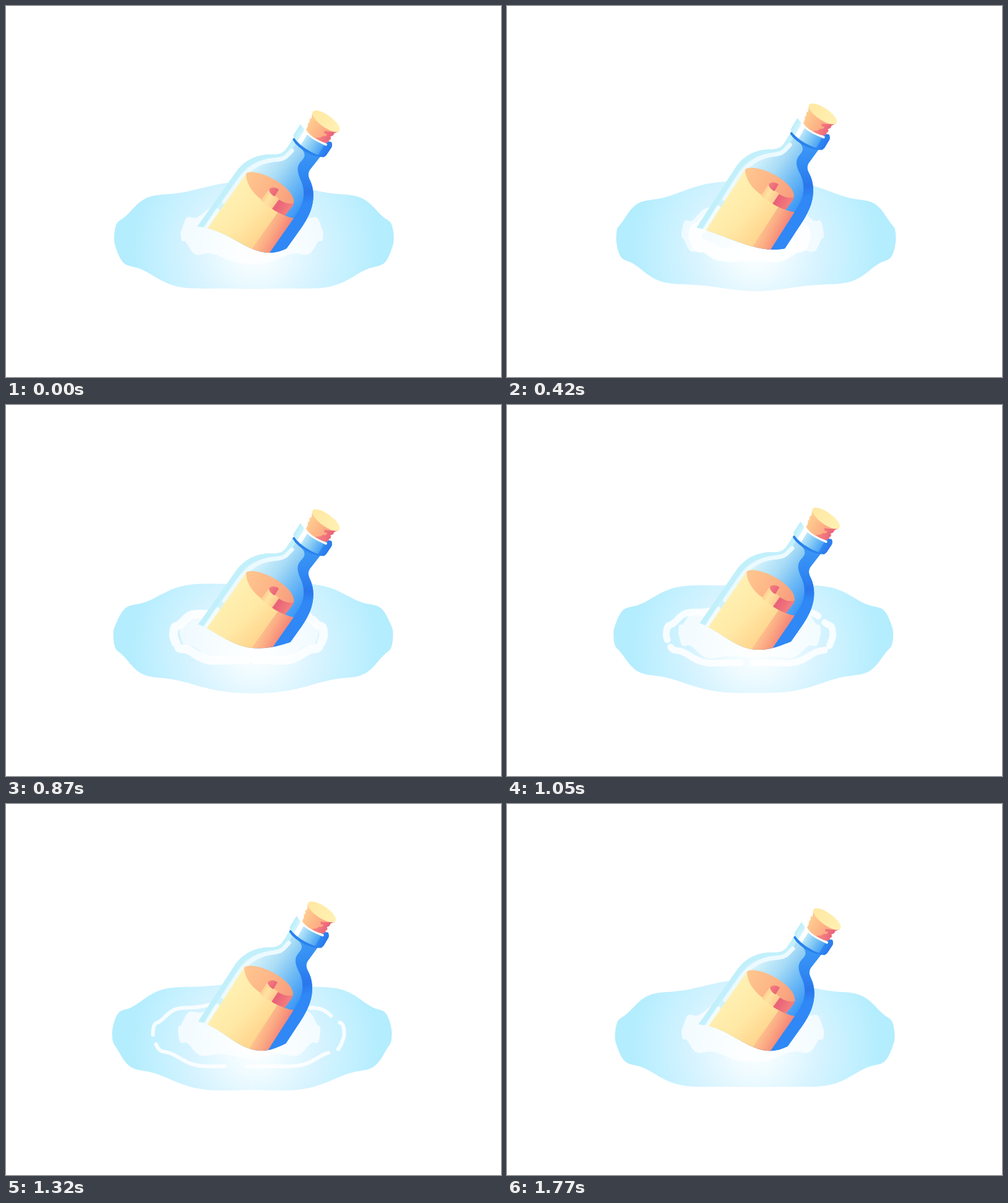
These frames come from a looping animation (800x600 px, 1.8 s). An HTML page with a canvas:

```html
<!DOCTYPE html>
<html lang="en">
<head>
<meta charset="utf-8">
<title>Message in a bottle</title>
<style>
html, body { margin: 0; width: 100%; height: 100%; overflow: hidden; background: #fff; }
canvas { display: block; width: 800px; height: 600px; }
</style>
</head>
<body>
<canvas id="stage" width="800" height="600"></canvas>
<script>
const ctx = document.getElementById('stage').getContext('2d');
const LOOP = 1800, STEP = 30, TAU = 2 * Math.PI;

const turn = x => Math.cos(TAU * x);
function smooth(x) {
  const u = Math.max(0, Math.min(1, x));
  return u * u * (3 - 2 * u);
}

// Soft oval whose waves run from its top and bottom out to both sides.
function rimPoint(o, deg) {
  const a = deg * Math.PI / 180, c = Math.cos(a), s = Math.sin(a), h = Math.abs(s);
  const crest = Math.pow(Math.asin(Math.min(1, Math.abs(c))) / .92, 1.5) - o.phase;
  const wave = o.amp * Math.tanh(5 * h);
  const lift = Math.pow(h, .87);
  const dy = s >= 0 ? o.down * lift - wave * turn(crest)
                    : wave * turn(crest + .58) - o.up * lift;
  return [o.x + o.rx * c, o.y + dy + (o.sway || 0) * Math.pow(c, 8)];
}

function rimArc(o, from, to, path = new Path2D()) {
  const n = Math.ceil((to - from) / 2);
  path.moveTo(...rimPoint(o, from));
  for (let i = 1; i <= n; i++) path.lineTo(...rimPoint(o, from + (to - from) * i / n));
  return path;
}

function stops(g, list) {
  for (const [p, c] of list) g.addColorStop(p, c);
  return g;
}
const linear = (x0, y0, x1, y1, ...list) => stops(ctx.createLinearGradient(x0, y0, x1, y1), list);
const white = alpha => `rgba(255,255,255,${alpha})`;

const shape = d => d instanceof Path2D ? d : new Path2D(d);
function fill(d, paint) {
  ctx.fillStyle = paint;
  ctx.fill(shape(d));
}
function stroke(d, paint, width) {
  ctx.strokeStyle = paint;
  ctx.lineWidth = width;
  ctx.stroke(shape(d));
}

const pondPaint = stops(ctx.createRadialGradient(402, 394, 0, 402, 394, 202),
  [[0, '#ffffff'], [.22, '#effbff'], [.52, '#d6f3ff'], [.8, '#c2f0ff'], [1, '#b3edfe']]);

function drawPond(t) {
  const pond = {
    x: 400 + 2.5 * turn(t - .2), y: 373.5, rx: 226, up: 87, down: 88.5,
    amp: 4.3, phase: t, sway: 3 * turn(t - .11)
  };
  fill(rimArc(pond, 0, 360), pondPaint);
}

// The old foam fades while fresh foam spreads out from the bottle.
function drawFoam(t) {
  const layer = (size, alpha) => {
    const foam = {
      x: 395 + 3 * turn(t - .1), y: 368, rx: 115 * size, up: 46 * size, down: 44 * size,
      amp: 5 * size, phase: t + .5
    };
    fill(rimArc(foam, 0, 360), white(.72 * alpha));
  };
  const grow = smooth((t - .2) / .35), fade = 1 - smooth((t - .2) / .2);
  if (fade > 0) layer(1, fade);
  if (grow > 0) layer(.75 + .25 * grow, grow);
}

// A ring that widens, thins out and opens at four gaps.
function drawRipple(t) {
  const width = Math.min(29.5 - 32 * t, 160 * (t - .1));
  if (width <= 0) return;
  const rx = 57 + 133 * t;
  const ring = { x: 392, y: 371, rx, up: rx * .34, down: rx * .365, amp: 3, phase: 0 };
  const age = t - .583, half = Math.max(0, 4.5 + 13 * age);
  const gaps = [-30, 21, 92, 166, 330].map(g => g + 40 * age);
  const path = new Path2D();
  for (let i = 0; i < 4; i++) rimArc(ring, gaps[i] + half, gaps[i + 1] - half, path);
  stroke(path, white(.86), width);
}

function clipWater(t) {
  const path = new Path2D();
  path.moveTo(250, 100);
  for (let x = 250; x <= 500; x += 5) {
    const rest = 374.5 - 21.5 * Math.cos(Math.PI * Math.max(0, x - 291) / 128);
    path.lineTo(x, rest + 4 * turn(t - .75 - (x - 400) * .0062));
  }
  path.lineTo(600, 380);
  path.lineTo(600, 100);
  ctx.clip(path);
}

const BODY = new Path2D('M270 412 L372 268 C388 246 410 240 428 240 C442 241 448 238 453 231 ' +
  'L466 212 L510 241 L491 265 C488 270 488 275 491 281 C499 297 498 316 492 332 ' +
  'C486 347 478 358 470 369 L430 425 Z');

function drawGlass() {
  fill(BODY, linear(405, 258, 482, 318, [0, '#d2f2fb'], [.35, '#a9dcf6'], [.65, '#72bdf5'], [1, '#3d99f6']));
  ctx.save();
  ctx.clip(BODY);
  stroke('M270 412 L372 268 C388 246 410 240 428 240 C442 241 448 238 453 231 L466 212', '#c1f0fb', 16);
  fill('M466 212 L520 241 L492 265 L505 300 L492 340 L430 425 L400 425 L455 358 L468 338 ' +
    'C483 318 484 300 477 283 C469 266 470 258 478 250 C486 242 484 234 467 222 Z',
    linear(484, 232, 496, 318, [0, '#3d99f6'], [.45, '#3089f3'], [.8, '#2a76ec'], [1, '#2f88f5']));
  ctx.restore();
  stroke('M353 317 L376 284 C392 261 411 251 432 249 C446 248 451 246 456 240 L462 234', '#ecfaff', 7);
  stroke('M319 366 L342 331', '#f1fcff', 7);
}

function drawPaper() {
  // rolled top
  fill('M388 271 C394 265 416 270 436 282 C454 293 467 307 465 319 L441 334 L412 315 C398 304 387 285 388 271 Z',
    linear(390, 275, 462, 318, [0, '#ffc68f'], [.5, '#fdb587'], [1, '#f79c7d']));
  // sheet and its shaded side
  fill('M388 271 C387 284 397 302 413 313 C420 320 431 327 440 333 L380 420 L285 417 Z',
    linear(350, 310, 412, 372, [0, '#fff1b3'], [.55, '#ffe9a6'], [1, '#ffd790']));
  fill('M440 333 C448 338 457 342 465 343 L408 425 L374 425 Z',
    linear(413, 360, 446, 378, [0, '#ffc590'], [.45, '#fbab83'], [1, '#f48279']));
  // curl at the front
  fill('M412 314 L425 296 C428 304 435 306 442 313 L431 328 C424 324 418 320 412 314 Z',
    linear(414, 307, 438, 321, [0, '#ffc88d'], [.4, '#ffe3a1'], [1, '#fdc58d']));
  fill('M441 313 C450 319 458 321 465 319 C464 324 459 328 451 339 C444 336 437 333 430 328 Z',
    linear(440, 320, 458, 331, [0, '#ea6379'], [1, '#f47f7d']));
  fill('M425 297 C427 293 435 292 441 297 L434 308 C428 305 426 301 425 297 Z',
    linear(427, 295, 437, 304, [0, '#f37f7e'], [1, '#e9637a']));
}

function drawNeck() {
  stroke('M466 216 C475 230 497 242 513 242', '#2a82ee', 5);
  fill('M476 191 C484 205 507 221 526 222 Q528 225 526 229 L518 241 Q516 244 512 243 ' +
    'C493 239 472 224 465 212 Q464 210 465 208 Z',
    linear(468, 203, 521, 236, [0, '#baeefb'], [.16, '#d2f4fc'], [.19, '#ffffff'], [.29, '#ffffff'],
      [.31, '#b9e6fa'], [.55, '#82c9f5'], [.8, '#4ea5f4'], [.83, '#2f88f2'], [1, '#2a78ec']));
  fill('M508 216 L526 220 Q528 223 526 229 L520 226 Z', '#2d7fec');
  stroke('M483 201 C492 212 504 218 517 224', '#ffffff', 4);
}

function drawCork() {
  fill('M495 173 L494 181 Q489 183 491 187 Q487 190 488 194 L485 200 C490 209 502 217 516 221 ' +
    'Q521 222 522 217 Q527 215 524 211 Q530 210 530 206 L538 203 Z',
    linear(488, 190, 525, 215, [0, '#ffcd90'], [.5, '#fdb486'], [1, '#fa9e80']));
  fill('M538 202 C529 205 522 203 515 202 Q512 207 519 207 Q518 212 512 210 Q508 214 500 213 ' +
    'C505 217 511 220 516 221 Q521 222 522 217 Q527 215 524 211 Q530 210 530 206 Z',
    linear(508, 208, 528, 214, [0, '#f58280'], [1, '#e9607a']));
  const top = new Path2D();
  top.ellipse(517.3, 186.3, 26.5, 9.8, Math.PI / 5, 0, TAU);
  fill(top, linear(500, 178, 535, 198, [0, '#ffe9a4'], [1, '#fff0b2']));
}

// t runs from 0 to 1 over the loop; the bottle rocks twice.
function draw(t) {
  ctx.fillStyle = '#fff';
  ctx.fillRect(0, 0, 800, 600);
  ctx.lineCap = 'round';
  ctx.lineJoin = 'round';
  drawPond(t);
  drawFoam(t);
  drawRipple(t);

  ctx.save();
  clipWater(t);
  ctx.translate(230, 345);
  ctx.rotate(-.021 * (1 - turn(2 * t)));
  ctx.translate(-230, -345);
  drawGlass();
  drawPaper();
  drawNeck();
  drawCork();
  ctx.restore();
}

const start = performance.now();
function tick() {
  const ms = (performance.now() - start) % LOOP;
  draw(Math.floor(ms / STEP) * STEP / LOOP);
  requestAnimationFrame(tick);
}
tick();
</script>
</body>
</html>
```
